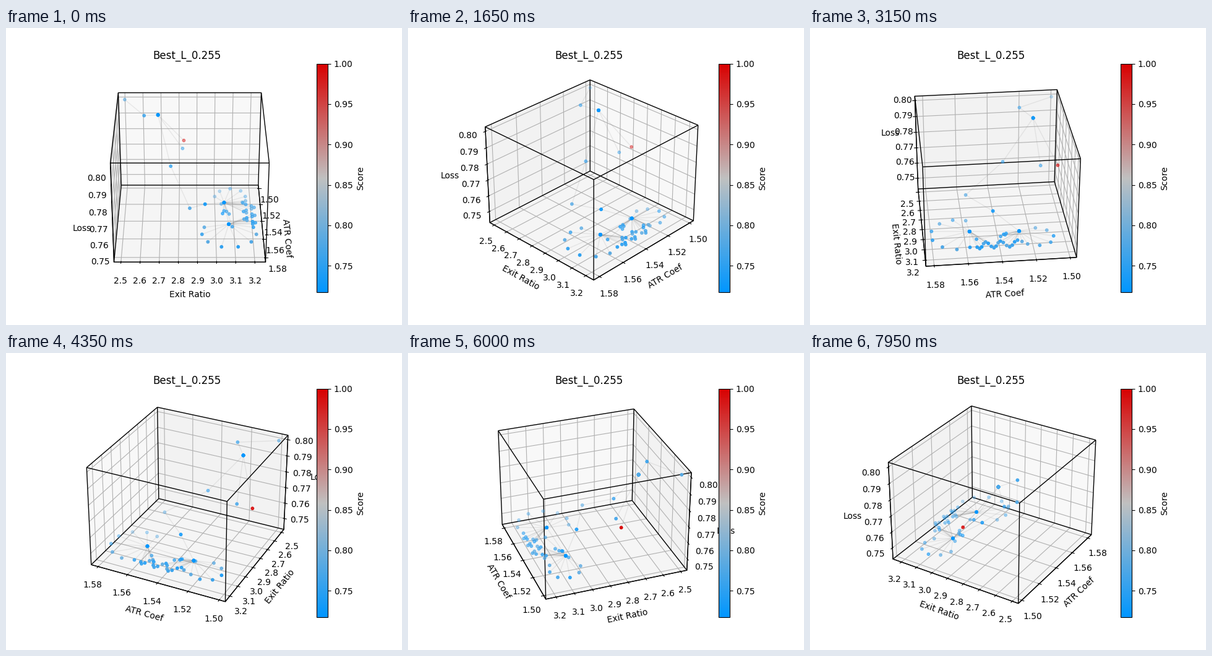
Write a matplotlib script that moves like this. It is 640 by 480 pixels and loops after 8 s.

```python
import numpy as np
import matplotlib.pyplot as plt
from itertools import combinations, product
from matplotlib.animation import FuncAnimation
from matplotlib.cm import ScalarMappable
from matplotlib.colors import LinearSegmentedColormap, Normalize
from mpl_toolkits.mplot3d.art3d import Line3DCollection

TICK_MS, TICKS_PER_STEP, LOOP_MS = 50, 3, 8000
DEGREES_PER_STEP = 4
LOW, HIGH = 0.717, 1.0

# Axis ranges: ATR Coef, Exit Ratio, Loss
LIMITS = np.array([(1.4962, 1.5848), (2.4634, 3.2560), (0.7428, 0.8027)])
BOX = np.array([4, 4, 3]) / 3.36  # box size of the 3D view

# Positions below are in box units from the box centre
TRAIL = [(-.54, -.54, .41), (-.25, -.37, .41), (-.35, -.26, .365),
         (-.53, -.05, .03), (-.39, -.06, .03), (-.09, -.155, .03),
         (.23, 0, -.175), (.02, .125, -.265)]
FAR_HUB, NEAR_HUB = (-.175, .287, -.368), (.228, .315, -.327)
SIDE_STOP = (-.052, .272, -.40)
START, MIDDLE, BRANCH, BEST, SPUR, TURN, DROP, LANDING = TRAIL


def at_height(x, y, z):
    return [(a, b, z) for a, b in zip(x, y)]


def fan(hub, angles, radii, z):
    return at_height(hub[0] + radii * np.cos(angles),
                     hub[1] + radii * np.sin(angles), z)


# Outward fans on either side of the two hubs
spread = np.radians(np.linspace(-86, 86, 8))
near_fan = fan(NEAR_HUB, spread, 0.19 + 0.12 * np.cos(spread), -0.348)
spread = np.radians(np.linspace(-50, 50, 6))
far_fan = fan(FAR_HUB, np.radians(158) - spread,
              0.18 + 0.105 * np.cos(2 * spread), -0.395)

# Samples between the hubs, crowded in the middle
v = np.linspace(-0.8, 1, 5)
bridge = at_height(-0.06 + 0.235 * v**3, 0.30 + 0.045 * v, -0.385)

# Dense wavy band along the high end of Exit Ratio
k = np.arange(18)
band = at_height(-0.176 + 0.361 * (k / 17)**0.85,
                 0.488 - 0.045 * np.cos(2 * np.pi * (k - 1) / 6), -0.352)

singles = TRAIL + near_fan + far_fan + bridge + band
# Samples visited more than once look more solid
repeats = [BRANCH, FAR_HUB, NEAR_HUB] * 6 + [LANDING, SIDE_STOP]
units = np.array(singles + repeats)

rng = np.random.default_rng(4)
scores = rng.uniform(0.725, 0.785, len(units))
scores[singles.index(BEST)] = HIGH
scores[len(singles):] = LOW

links = [(START, MIDDLE), (MIDDLE, BRANCH), (BRANCH, BEST), (BRANCH, SPUR),
         (BRANCH, TURN), (TURN, DROP), (DROP, LANDING), (LANDING, FAR_HUB),
         (FAR_HUB, NEAR_HUB), (FAR_HUB, SIDE_STOP)]
links += [(FAR_HUB, p) for p in far_fan + bridge + band[:9]]
links += [(NEAR_HUB, p) for p in near_fan + band[9:]]


def to_data(position):
    return LIMITS.mean(axis=1) + position / BOX * np.ptp(LIMITS, axis=1)


corners = product(*LIMITS)
edges = [pair for pair in combinations(corners, 2)
         if sum(a != b for a, b in zip(*pair)) == 1]

cmap = LinearSegmentedColormap.from_list(
    "score", ["#0096ff", "#c0c0c0", "#d80000"])
norm = Normalize(LOW, HIGH)

fig = plt.figure(figsize=(6.4, 4.8), dpi=100)
ax = fig.add_subplot(projection="3d", computed_zorder=False)
ax.add_collection3d(Line3DCollection(
    to_data(np.array(links)), colors="gray", linewidths=1, alpha=0.14,
    zorder=2))
ax.add_collection3d(Line3DCollection(
    edges, colors="black", linewidths=1, snap=False, zorder=2.1))
# No alpha here: it would switch off the depth shading
ax.scatter(*to_data(units).T, c=scores, cmap=cmap, norm=norm, s=10, zorder=3)
fig.colorbar(ScalarMappable(norm, cmap), ax=ax, label="Score")

ax.set(title="Best_L_0.255", xlabel="ATR Coef", ylabel="Exit Ratio",
       zlabel="Loss",
       xticks=np.linspace(1.50, 1.58, 5), yticks=np.linspace(2.5, 3.2, 8),
       zticks=np.linspace(0.75, 0.80, 6))
ax.set(xlim=LIMITS[0], ylim=LIMITS[1], zlim=LIMITS[2])


def update(tick):
    ax.view_init(elev=30, azim=DEGREES_PER_STEP * (tick // TICKS_PER_STEP))
    return []


anim = FuncAnimation(fig, update, frames=LOOP_MS // TICK_MS,
                     interval=TICK_MS, repeat=True, repeat_delay=0)
plt.show()
```
